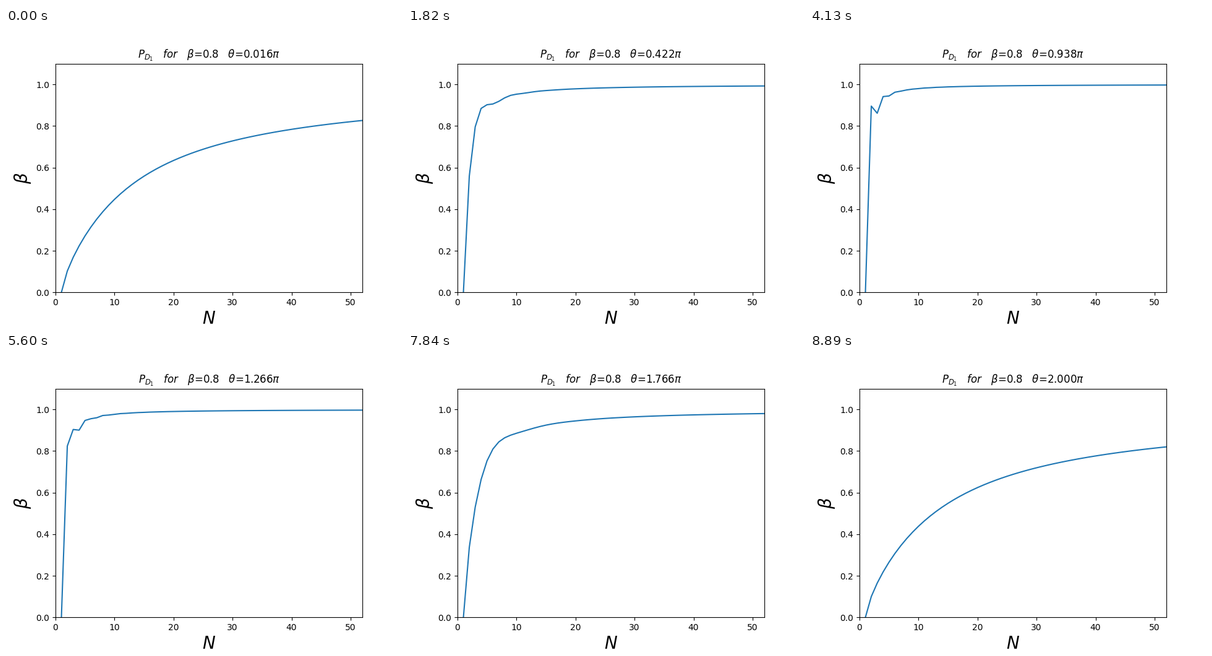
Recreate the animation shown at these times as a matplotlib script. Size 640 by 480 pixels, loop 8960 ms.

```python
import numpy as np
import matplotlib.pyplot as plt
from matplotlib.animation import FuncAnimation

FRAMES = 128
INTERVAL = 70
BETA = 0.8
N = np.arange(1, 61)


def survival(n, z):
    """Amplitude left in the first arm after n rotations by pi/2n,
    with the second arm multiplied by z between them."""
    c, s = np.cos(np.pi / (2 * n)), np.sin(np.pi / (2 * n))
    a, b = c, s
    for _ in range(n - 1):
        b = z * b
        a, b = c * a - s * b, s * a + c * b
    return abs(a)


fig, ax = plt.subplots(figsize=(6.4, 4.8), dpi=100)
ax.set_xlim(0, 52)
ax.set_ylim(0, 1.1)
ax.set_xlabel(r"$N$", fontsize=20)
ax.set_ylabel(r"$\beta$", fontsize=20)
line, = ax.plot([], [])
title = ax.set_title("")


def update(i):
    turns = 2 * (i + 1) / FRAMES
    z = BETA * np.exp(1j * np.pi * turns)
    line.set_data(N, [survival(n, z) for n in N])
    title.set_text(
        rf"$P_{{D_1}}$   $for$   $\beta$={BETA}   $\theta$={turns:.3f}$\pi$")
    return line, title


anim = FuncAnimation(fig, update, frames=FRAMES, interval=INTERVAL,
                     init_func=lambda: update(0), repeat=True, repeat_delay=0)
plt.show()
```
